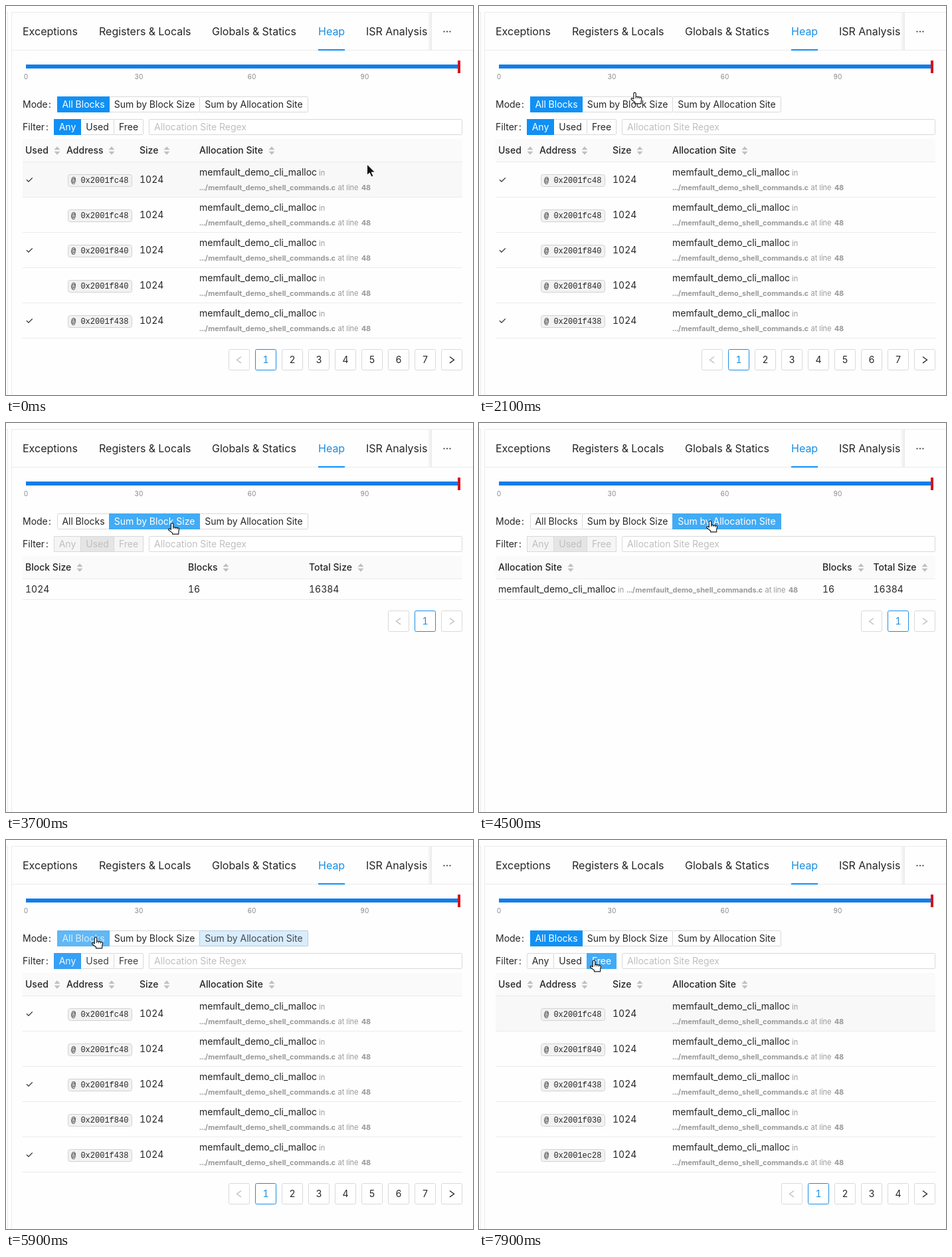
Recreate the animation shown at these times as an HTML page. Size 703 by 585 pixels, loop 8000 ms.

```html
<!DOCTYPE html>
<html lang="en">
<head>
<meta charset="utf-8">
<title>Heap viewer</title>
<style>
html, body { margin: 0; width: 100%; height: 100%; overflow: hidden; background: #fefefe; }
svg { display: block; }
text { font: 14px Inter, "DejaVu Sans", sans-serif; font-feature-settings: "tnum"; fill: #262626; white-space: pre; }
.tab { font-size: 16px; }
.head { font-weight: 500; }
.small { font-size: 11px; fill: #999; }
.bold { font-weight: 700; }
.mark { font-size: 10px; fill: #888; }
.code { font: 12px "Liberation Mono", monospace; }
.mid { text-anchor: middle; }
.pale { fill: #bfbfbf; }
.blue { fill: #1a8fe3; }
</style>
</head>
<body>
<svg id="stage" width="703" height="585" viewBox="0 0 703 585"></svg>
<script>
const LOOP = 8000, STEP = 100;
const BLUE = '#1090f5', HOVER = '#42abf5', INK = '#262626', LINK = '#2592dc', PALE = '#bfbfbf', EDGE = '#d9d9d9', LINE = '#ebebeb';
const stage = document.getElementById('stage');

function add(parent, tag, attrs, label) {
  const el = document.createElementNS('http://www.w3.org/2000/svg', tag);
  for (const k in attrs) el.setAttribute(k, attrs[k]);
  if (label !== undefined) el.textContent = label;
  parent.appendChild(el);
  return el;
}
const group = () => add(stage, 'g', {});
const text = (p, x, y, label, cls = '') => add(p, 'text', { x, y, class: cls }, label);
const fill = (p, x, y, width, height, color) => add(p, 'rect', { x, y, width, height, fill: color });
const box = (p, x, y, w, h, color, stroke, rx = 0) =>
  add(p, 'rect', { x: x + .5, y: y + .5, width: w - 1, height: h - 1, rx, fill: color, stroke });
const show = (el, on) => el.setAttribute('visibility', on ? 'visible' : 'hidden');

// Page frame, tabs and slider
const page = group();
fill(page, 0, 0, 703, 585, '#fefefe');
fill(page, 0, 9, 3, 1, LINE);
fill(page, 2, 9, 1, 576, LINE);
fill(page, 8, 9, 695, 1, LINE);
fill(page, 8, 9, 1, 576, LINE);
fill(page, 9, 66, 694, 1, LINE);
[[25, 'Exceptions'], [140, 'Registers & Locals'], [310, 'Globals & Statics'], [470, 'Heap'], [542, 'ISR Analysis']]
  .forEach(([x, label]) => text(page, x, 44, label, label === 'Heap' ? 'tab blue' : 'tab'));
fill(page, 470, 65, 40, 2, BLUE);
const shade = add(page, 'linearGradient', { id: 'shade' });
add(shade, 'stop', { offset: 0, 'stop-color': '#000', 'stop-opacity': 0 });
add(shade, 'stop', { offset: 1, 'stop-color': '#000', 'stop-opacity': .08 });
fill(page, 634, 10, 7, 56, 'url(#shade)');
fill(page, 641, 10, 62, 56, '#fefefe');
[659.5, 664, 668.5].forEach(cx => add(page, 'circle', { cx, cy: 38.5, r: 1.1, fill: '#333' }));

const track = fill(page, 30, 88, 652, 6, '#127de8');
const handle = fill(page, 680, 82, 4, 19, '#d5141c');
[0, 30, 60, 90].forEach((n, i) => text(page, 30 + 170 * i, 110, n, 'mark mid'));

text(page, 25, 153, 'Mode');
text(page, 64, 153, ':');
text(page, 25, 187, 'Filter');
text(page, 60, 187, ':');
const input = box(page, 215, 170, 472, 24, '#fff', EDGE, 1);
text(page, 223, 187, 'Allocation Site Regex', 'pale');

// Tables
function header(p, cols) {
  fill(p, 25, 200, 662, 34, '#fafafa');
  fill(p, 25, 234, 662, 1, LINE);
  cols.forEach(([x, label, cx]) => {
    text(p, x, 222, label, 'head');
    add(p, 'path', { d: `M${cx - 4.5} 216.3l4.5-5 4.5 5zM${cx - 4.5} 218.7l4.5 5 4.5-5z`, fill: PALE });
  });
}

function site(p, x, y, px, py) {
  text(p, x, y, 'memfault_demo_cli_malloc');
  text(p, x + 180, y, 'in', 'small');
  text(p, px, py, '.../memfault_demo_shell_commands.c', 'small bold');
  text(p, px + 208.5, py, 'at line', 'small');
  text(p, px + 244, py, '48', 'small bold');
}

function chevron(p, x, y, dir, color) {
  add(p, 'path', { d: `M${x - 3 * dir} ${y - 4.5}l${6.5 * dir} 4.7l${-6.5 * dir} 4.7`, fill: 'none', stroke: color, 'stroke-width': 1.3 });
}

function pager(p, count, y) {
  const left = 655 - 40 * (count + 1);
  for (let i = 0; i < count + 2; i++) {
    const x = left + 40 * i, on = i === 1;
    box(p, x, y, 32, 32, '#fff', on ? '#1a8fe3' : EDGE, 2);
    if (i > 0 && i <= count) text(p, x + 16, y + 21, i, on ? 'mid blue' : 'mid');
  }
  chevron(p, left + 16, y + 16, -1, PALE);
  chevron(p, 671, y + 16, 1, count > 1 ? INK : PALE);
}

function blocks(addresses, used, pages) {
  const g = group();
  header(g, [[29, 'Used', 77], [91, 'Address', 159], [201, 'Size', 242], [291, 'Allocation Site', 400]]);
  const first = fill(g, 25, 235, 662, 52, '#f8f8f8');
  addresses.forEach((a, i) => {
    const y = 235 + 53 * i;
    fill(g, 25, y + 52, 662, 1, LINE);
    if (used(i)) text(g, 29, y + 31, '✓');
    box(g, 93, y + 18, 97, 19, '#f2f2f2', '#d2d2d2', 3);
    text(g, 98, y + 31, '@ 0x2001' + a, 'code');
    text(g, 201, y + 31, '1024');
    site(g, 291, y + 20, 291, y + 42);
  });
  pager(g, pages, 516);
  g.first = first;
  return g;
}

function sums(cols, row) {
  const g = group();
  header(g, cols);
  row(g);
  fill(g, 25, 265, 662, 1, LINE);
  pager(g, 1, 282);
  return g;
}

const half = ['fc48', 'f840', 'f438', 'f030', 'ec28'];
const all = blocks(['fc48', 'fc48', 'f840', 'f840', 'f438'], i => i % 2 === 0, 7);
const bySize = sums([[29, 'Block Size', 111], [274, 'Blocks', 331], [456, 'Total Size', 534]], g => {
  text(g, 29, 255, '1024');
  text(g, 274, 255, '16');
  text(g, 456, 255, '16384');
});
const bySite = sums([[29, 'Allocation Site', 138], [517, 'Blocks', 575], [593.5, 'Total Size', 671]], g => {
  site(g, 29, 255, 222, 255);
  text(g, 517, 255, '16');
  text(g, 593.5, 255, '16384');
});
const usedOnly = blocks(half, () => true, 4);
const freeOnly = blocks(half, () => false, 4);

const CLICK = { size: 2750, site: 4150, all: 5680, used: 6580, free: 7560 };
const views = [[0, all], [CLICK.size, bySize], [CLICK.site, bySite], [CLICK.all, all], [CLICK.used, usedOnly], [CLICK.free, freeOnly]];

// Buttons: each state is [opacity of the colour layer, colour, text colour]
const OFF = [0, HOVER, INK], OVER = [0, HOVER, LINK], ON = [1, BLUE, '#ffffff'], HOT = [1, HOVER, '#ffffff'], GRAY = [0, HOVER, PALE];
const specs = [
  ['All Blocks', 77, 136, 79, [[0, ON], [CLICK.size, OFF], [5300, OVER], [CLICK.all, HOT], [6200, ON]]],
  ['Sum by Block Size', 155, 136, 137, [[0, OFF], [2150, OVER], [CLICK.size, HOT], [3850, ON], [CLICK.site, OFF]]],
  ['Sum by Allocation Site', 291, 136, 164, [[0, OFF], [3950, OVER], [CLICK.site, HOT], [5250, ON], [CLICK.all, OFF]]],
  ['Any', 72, 170, 41, [[0, ON], [CLICK.size, GRAY], [CLICK.all, ON], [CLICK.used, OFF]]],
  ['Used', 112, 170, 51, [[0, OFF], [CLICK.size, GRAY], [CLICK.all, OFF], [6250, OVER], [CLICK.used, HOT], [7250, ON], [CLICK.free, OFF]]],
  ['Free', 162, 170, 45, [[0, OFF], [CLICK.size, GRAY], [CLICK.all, OFF], [7300, OVER], [CLICK.free, HOT]]]
];
const base = group(), tint = group(), locked = group(), labels = group();
const buttons = specs.map(([label, x, y, w, steps]) => {
  box(base, x, y, w, 24, '#fff', EDGE, 1);
  if (y === 170) box(locked, x, y, w, 24, label === 'Used' ? '#e5e5e5' : '#f5f5f5', EDGE);
  return { steps, layer: fill(tint, x, y, w, 24, BLUE), label: text(labels, x + w / 2, y + 17, label, 'mid') };
});

// Pointers, drawn with the tip at 0,0
const arrow = add(stage, 'path', {
  d: 'M0 0V16.5L3.8 13L6.6 19L9.4 17.8L6.7 12H12Z', fill: '#111', stroke: '#fff', 'stroke-width': 1
});
const hand = group();
add(hand, 'path', {
  d: 'M-2.2 1.8Q-2.2 .2 -.5 .2Q1.2 .2 1.2 1.8V6.2L8 7.2Q10 7.7 10 9.6L9.2 13V16.8H0V15L-5.8 10.6Q-6.4 8.4 -4.4 8.4L-2.2 9.8Z',
  fill: '#fff', stroke: '#1c1c1c', 'stroke-width': 1.2, 'stroke-linejoin': 'round'
});
add(hand, 'path', { d: 'M1.2 6V9M4.1 6.8V9.2M7 7.2V9.6', stroke: '#1c1c1c', 'stroke-width': 1 });

const path = [
  [0, 543.5, 238], [400, 543.5, 238], [900, 516, 150], [1300, 488, 87], [1500, 352, 87], [1700, 352, 87],
  [2100, 235, 130], [2300, 232.5, 151], [3600, 232.5, 151], [4000, 348.5, 147], [5100, 348.5, 147],
  [5500, 135.5, 146], [6000, 135.5, 146], [6400, 136, 181], [7100, 136, 181], [7400, 173.5, 181], [LOOP, 173.5, 181]
];

const clamp = v => Math.min(1, Math.max(0, v));
const ease = p => p < .5 ? 2.6 * p * p * (1 - p * .46) : 1 - 2.6 * (1 - p) ** 2 * (1 - (1 - p) * .46);
const smooth = p => p * p * (3 - 2 * p);
const lerp = (a, b, p) => a + (b - a) * p;
const rgb = c => [1, 3, 5].map(i => parseInt(c.slice(i, i + 2), 16));
const mix = (a, b, p) => {
  const to = rgb(b);
  return `rgb(${rgb(a).map((v, i) => Math.round(lerp(v, to[i], p)))})`;
};
const lastIndex = (list, t) => list.reduce((n, s, i) => s[0] <= t ? i : n, 0);

function pointer(t) {
  const i = Math.min(lastIndex(path, t), path.length - 2), a = path[i], b = path[i + 1];
  const p = smooth((t - a[0]) / (b[0] - a[0]));
  return [lerp(a[1], b[1], p), lerp(a[2], b[2], p)];
}

function paintButton({ steps, layer, label }, t) {
  const i = lastIndex(steps, t), to = steps[i][1], from = steps[Math.max(0, i - 1)][1];
  const p = ease(clamp((t - steps[i][0]) / 300));
  layer.setAttribute('opacity', lerp(from[0], to[0], p));
  const a = from[0] ? from[1] : to[1], b = to[0] ? to[1] : from[1];
  layer.setAttribute('fill', mix(a, b, p));
  label.style.fill = mix(from[2], to[2], p);
}

function render(t) {
  const [x, y] = pointer(t);
  const view = views[lastIndex(views, t)][1];
  views.forEach(v => show(v[1], v[1] === view));
  all.first.setAttribute('opacity', t < 1000 && y >= 235 ? 1 : 0);
  show(locked, t >= CLICK.size && t < CLICK.all);
  buttons.forEach(b => paintButton(b, t));

  const glow = ease(clamp((t - 1100) / 300)) - ease(clamp((t - 1800) / 300));
  track.setAttribute('fill', mix('#127de8', '#69c0ff', glow));
  handle.setAttribute('fill', mix('#d5141c', '#69c0ff', glow));
  input.setAttribute('stroke', x > 215 && y > 170 && y < 194 ? HOVER : EDGE);

  const pointing = t > 1000 && (t > 1300 || y < 112);
  show(arrow, !pointing);
  show(hand, pointing);
  (pointing ? hand : arrow).setAttribute('transform', `translate(${x} ${y})`);
}

const start = performance.now();
function tick() {
  const t = (performance.now() - start) % LOOP;
  render(Math.floor(t / STEP) * STEP);
  requestAnimationFrame(tick);
}
tick();
</script>
</body>
</html>
```
